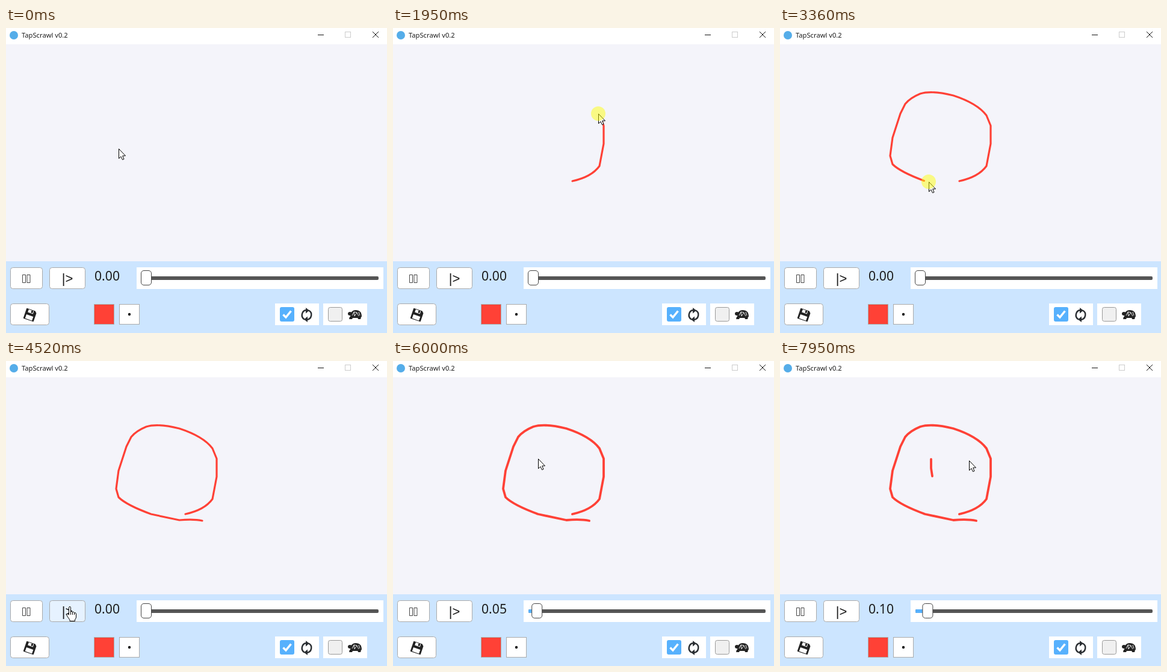
Recreate the animation shown at these times as an HTML page. Size 633x506 px, loop 8 s.

```html
<!DOCTYPE html>
<html lang="en">
<head>
<meta charset="utf-8">
<title>Drawing tool</title>
<style>
html, body { margin: 0; width: 100%; height: 100%; overflow: hidden; background: #f4f4fa; }
svg { display: block; width: 633px; height: 506px; }
text { font-family: "Noto Sans", "Open Sans", sans-serif; fill: #1c1c1c; }
.symbols { font: 22px "Liberation Sans", sans-serif; }
.button { fill: #fff; stroke: #aaa; }
.ink { fill: none; stroke: #ff4136; stroke-linecap: round; stroke-linejoin: round; }
.pointer { fill: #fff; stroke: #000; stroke-linejoin: round; }
</style>
</head>
<body>
<svg viewBox="0 0 633 506">
  <rect width="633" height="506" fill="#f4f4fa"/>
  <rect width="633" height="27" fill="#fff"/>
  <circle cx="13" cy="12" r="7" fill="#55ade9"/>
  <text x="26" y="16" font-size="11.2">TapScrawl v0.2</text>
  <path d="M518 11.500h10M609 6l10 10m0-10l-10 10" stroke="#111" fill="none"/>
  <rect x="563.5" y="6.5" width="9" height="9" fill="none" stroke="#ccc"/>

  <rect y="387" width="633" height="119" fill="#cce5ff"/>
  <rect class="button" x="7.5" y="397.5" width="53" height="35" rx="4"/>
  <path d="M27.500 409.500h5v13h-5zM35 409.500h5v13h-5z" fill="none" stroke="#333" stroke-width=".9"/>
  <rect class="button" id="step" x="72.5" y="397.5" width="59" height="35" rx="4"/>
  <text class="symbols" x="102" y="423" text-anchor="middle">|&gt;</text>
  <text id="time" x="147" y="419" font-size="21.2">0.00</text>
  <rect x="217" y="397" width="410" height="36" fill="#fff"/>
  <rect x="225" y="412" width="394" height="6" rx="2" fill="#555"/>
  <rect id="fill" x="225" y="412" width="0" height="6" rx="2" fill="#57b1fd"/>
  <rect id="thumb" x="224.5" y="402.5" width="17" height="24" rx="4.5" fill="#fff" stroke="#444"/>

  <rect class="button" x="7.5" y="457.5" width="64" height="35" rx="4"/>
  <g transform="translate(40 476) rotate(19)">
    <path d="M-9-8q0-1 1-1H6l3 3V8q0 1-1 1H-8q-1 0-1-1z" fill="#222"/>
    <path d="M-5-8H4v5H-5zM-6 1H6v7H-6z" fill="#fff"/>
    <path d="M0-8h3v4H0z" fill="#222"/>
  </g>
  <rect x="146.5" y="458.5" width="33" height="33" fill="#ff4136" stroke="#aaa"/>
  <rect x="188.5" y="458.5" width="33" height="33" fill="#fff" stroke="#aaa"/>
  <circle cx="205" cy="475" r="2.2" fill="#111"/>

  <path d="M447 457h73v36h-73zM527 457h73v36h-73z" fill="#fff"/>
  <rect x="455" y="463" width="24" height="24" rx="3" fill="#57b1fd"/>
  <path d="M460.500 475.500l4.500 4.500 8.500-10.500" fill="none" stroke="#fff" stroke-width="3.5"/>
  <g id="sync" fill="#2b2f33">
    <path d="M496 483.500a8.300 8.300 0 0 1 3-15.500" fill="none" stroke="#2b2f33" stroke-width="2.5"/>
    <path d="M498 464l6 4.500-6 5z"/>
  </g>
  <use href="#sync" transform="rotate(180 499.5 476)"/>
  <rect x="535.5" y="463.5" width="23" height="23" rx="3" fill="#f0f0f0" stroke="#999"/>
  <g fill="#222">
    <path d="M572 480q0-12 9-12q10 0 10 11l-4 2h-13z"/>
    <ellipse cx="571.500" cy="474" rx="3.500" ry="3"/>
    <path d="M571 479h6l-2 4h-5zM584 480h6l-1 3h-4z"/>
    <path d="M575 477l3-6 5 1 3 6M578 471l1 7M583 472l-4 6M586 471l2 6" fill="none" stroke="#fff" stroke-width=".9"/>
  </g>

  <path class="ink" id="ring" d="M298 254Q330 247 343 229L350 192V162L343 145Q328 125 288 112Q252 103 233 109Q216 116 208 126L200 142 187 182 183 212 187 226Q200 239 241 254L288 264Q312 262 326 265"/>
  <path class="ink" id="bar" d="M251 163V178L253 191"/>
  <path class="pointer" id="arrow" d="M.5.5V16.500L4 13.200L6.500 18.500L9 17.500L6.700 12H11.500Z"/>
  <path class="pointer" id="hand" d="M-1.500 13V1.500Q-1.500-.5 0-.5T1.500 1.500V8Q3.500 6.500 4.500 8.500Q6.500 7.500 7.500 9.500Q10.500 9 10.500 12V17Q10.500 19 8.500 21V23.500H0V21.500L-4.500 15Q-6 12-4 11.500Q-3 11.500-1.500 13ZM1.500 8V13M4.500 9V13M7.500 10V13"/>
  <circle id="press" r="12" fill="#ff0" fill-opacity=".47"/>
</svg>
<script>
const LOOP = 8000, STEP = 7950 / 102, PEN_LAG = 8;
const el = Object.fromEntries([...document.querySelectorAll("[id]")].map(e => [e.id, e]));

const clamp = k => Math.min(1, Math.max(0, k));
const smooth = k => k * k * (3 - 2 * k);

// A glide eases the free pointer along a curve; a stroke draws ink at a steady pace.
function glide(from, to, d) {
  const path = document.createElementNS("http://www.w3.org/2000/svg", "path");
  path.setAttribute("d", d);
  return { from, to, path, ease: smooth, length: path.getTotalLength() };
}
function stroke(from, to, path, committed) {
  return { from, to, path, committed, ease: k => k, length: path.getTotalLength() };
}

const ring = stroke(17, 47.5, el.ring, 61);
const bar = stroke(79, 83, el.bar, 93);
const legs = [
  glide(0, 11, "M187 200Q230 228 303 257"),
  glide(11, 14, "M303 257L298 254"),
  ring,
  glide(47, 58, "M319 272Q220 370 106 408"),
  glide(61, 66, "M106 408L300 169"),
  glide(66, 77, "M300 169Q330 110 241 162"),
  bar,
  glide(84, 91, "M253 192L80 430"),
  glide(93, 99, "M80 430L303 208"),
  glide(99, 102, "M303 208Q330 180 314 165"),
];
const isPressed = n =>
  n >= ring.from - 2 && n < 47 || n >= bar.from && n < 84 || n === 60 || n === 92;

const travelled = (leg, n) =>
  leg.ease(clamp((n - leg.from) / (leg.to - leg.from))) * leg.length;

function pointerAt(n) {
  const leg = legs.filter(l => l.from <= n).pop();
  const { x, y } = leg.path.getPointAtLength(travelled(leg, n));
  return [Math.round(x), Math.round(y)];
}

function drawInk(line, n) {
  const shown = n >= line.to ? line.length : Math.max(1, travelled(line, n) - PEN_LAG);
  line.path.setAttribute("visibility", n >= line.from ? "visible" : "hidden");
  line.path.setAttribute("stroke-dasharray", `${shown} ${line.length + 9}`);
  line.path.setAttribute("stroke-width", n >= line.committed ? 3.8 : 3.2);
}

function show(node, visible, [x, y]) {
  node.setAttribute("visibility", visible ? "visible" : "hidden");
  node.setAttribute("transform", `translate(${x} ${y})`);
}

function render(t) {
  const n = Math.min(102, Math.floor(t / STEP + .25));
  const at = pointerAt(n), [x, y] = at;
  const over = x >= 72 && x <= 132 && y >= 397 && y <= 433;
  const page = [ring, bar].filter(line => n >= line.committed).length;

  drawInk(ring, n);
  drawInk(bar, n);
  show(el.arrow, !over, at);
  show(el.hand, over, at);
  show(el.press, isPressed(n), at);
  el.step.style.fill = over ? "#e6f2ff" : "#fff";
  el.time.textContent = (page * .05).toFixed(2);
  el.thumb.setAttribute("x", 224.5 + page * 6.2);
  el.fill.setAttribute("width", page * 6.2);
}

const began = performance.now();
function tick(now) {
  render(Math.max(0, now - began) % LOOP);
  requestAnimationFrame(tick);
}
render(0);
requestAnimationFrame(tick);
</script>
</body>
</html>
```
